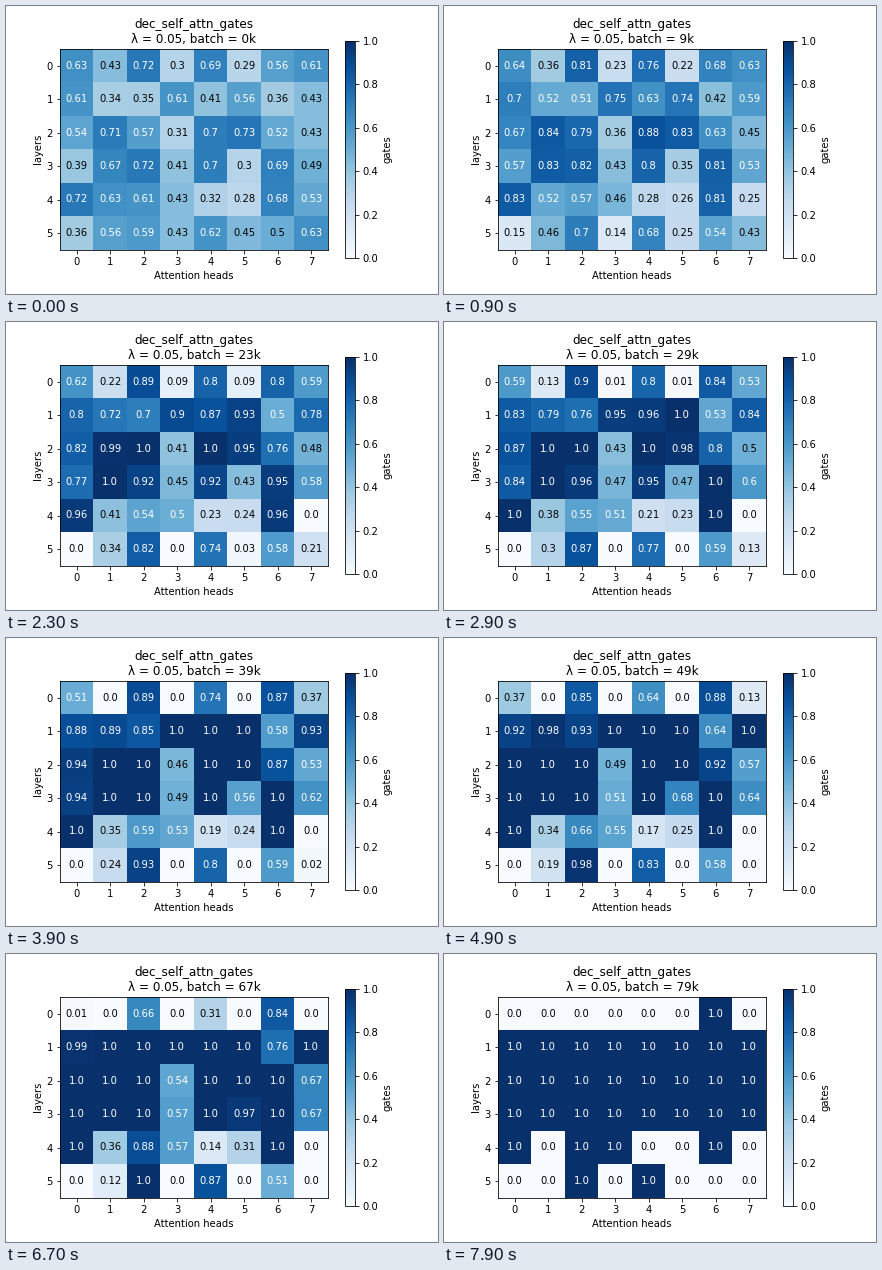
Recreate the animation shown at these times as a matplotlib script. Size 432 by 288 pixels, loop 8 s.

```python
import numpy as np
import matplotlib.pyplot as plt
from matplotlib.animation import FuncAnimation

FRAMES = 80
FREEZE = 70  # from this batch on the gates are hard 0 / 1

# Each head: start value, drift and, where the trend turns late, a bend.
LAYERS = [
    [(.63, .06, -.7), (.43, -.2, -1.2), (.72, .31, -.46), (.3, -.2, -1.1),
     (.69, .25, -.71), (.29, -.19, -1.1), (.56, .4, -.24), (.61, .1, -1.29)],
    [(.61, .29), (.34, .59), (.35, .53), (.61, .44),
     (.41, .71), (.56, .57), (.36, .2, .14), (.43, .53)],
    [(.54, .43), (.71, .43), (.57, .71), (.31, .15, .03),
     (.7, .57), (.73, .33), (.52, .37), (.43, .06, .16)],
    [(.39, .58), (.67, .52), (.72, .31), (.41, .06, .08),
     (.7, .33), (.3, .15, .47), (.69, .4), (.49, .14)],
    [(.72, .37), (.63, -.35, .19), (.61, -.15, .47), (.43, .11),
     (.32, -.14), (.28, -.08, .13), (.68, .43), (.53, -.92)],
    [(.36, -.69), (.56, -.34), (.59, .36), (.43, -.95),
     (.62, .19), (.45, -.64), (.5, .15, -.19), (.63, -.65)],
]


def gate(batch, start, drift, bend=0):
    """Drift slows down with the logarithm of time, the bend sets in late."""
    value = start + drift * np.log1p(batch / 25) + bend * (batch / 67) ** 2.5
    if batch >= FREEZE:
        return float(value > .5)
    return np.clip(value, 0, 1)


def gates_at(batch):
    return np.array([[gate(batch, *head) for head in layer]
                     for layer in LAYERS])


plt.rcParams.update({"font.family": "DejaVu Sans", "font.size": 10})
fig, ax = plt.subplots(figsize=(6, 4), dpi=72, facecolor="white")
fig.subplots_adjust(left=.125, right=.9, bottom=.125, top=.88)

image = ax.imshow(gates_at(0), cmap="Blues", vmin=0, vmax=1)
bar = fig.colorbar(image, ax=ax, ticks=np.linspace(0, 1, 6))
bar.set_label("gates")
ax.set_xticks(range(8))
ax.set_yticks(range(6))
ax.set_xlabel("Attention heads")
ax.set_ylabel("layers")
title = ax.set_title("")
labels = [[ax.text(x, y, "", ha="center", va="center") for x in range(8)]
          for y in range(6)]


def draw(batch):
    gates = gates_at(batch)
    image.set_data(gates)
    title.set_text(f"dec_self_attn_gates\nλ = 0.05, batch = {batch}k")
    for row, values in zip(labels, gates):
        for label, value in zip(row, values):
            # adding zero turns -0.0 into 0.0
            label.set_text(str(round(float(value), 2) + 0.0))
            label.set_color("white" if value > .5 else "black")
    return [image, title]


anim = FuncAnimation(fig, draw, frames=FRAMES, interval=100,
                     repeat=True, repeat_delay=0)
plt.show()
```
